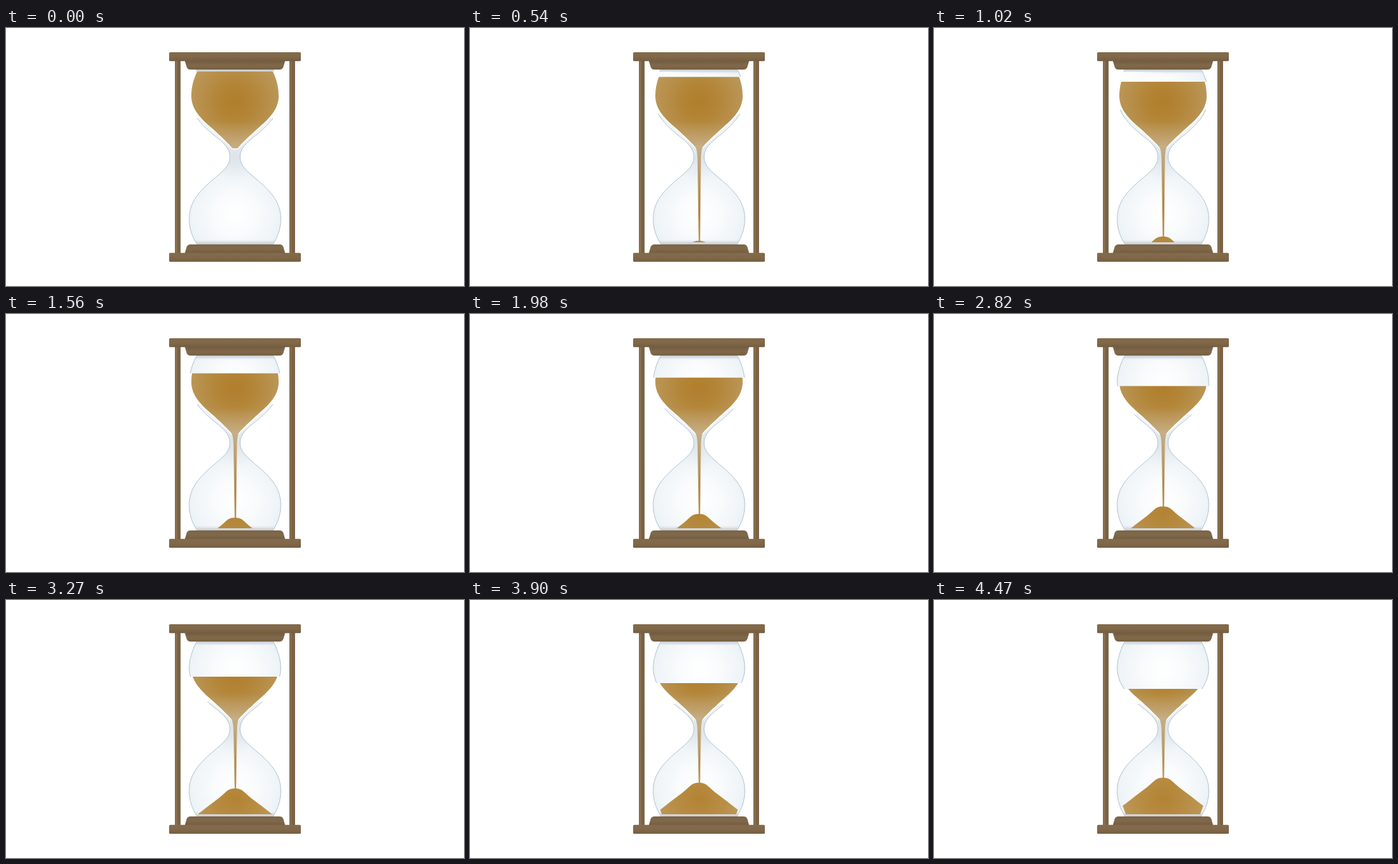
Write an HTML page with a canvas that moves like this. It is 640 px wide and 360 px high and loops after 4500 ms.

```html
<!DOCTYPE html>
<html lang="en">
<head>
<meta charset="utf-8">
<title>Hourglass</title>
<style>
html, body { margin: 0; width: 100%; height: 100%; overflow: hidden; background: #fff; }
canvas { display: block; width: 640px; height: 360px; }
</style>
</head>
<body>
<canvas id="stage" width="640" height="360"></canvas>
<script>
const ctx = document.getElementById('stage').getContext('2d');
const LOOP = 4500, STEP = 30, MID = 320, FLOOR = 299;

// Left-hand outlines; the right side is their mirror image.
const glassSide = 'M267 57C262 66 256.5 80 256 94C256 118 272 134 290 149C304 160 313 168 313 180' +
  'C313 192 304 199 290 211C272 226 256 242 256 266C256 280 260 291 267 302';
const sandSide = 'M268 59C262 71 259 82 259 95C259 114 273 127 288 140C298 149 308 158 314 165C316 168 318 168 320 168';
const pileSide = 'M320 0C315 0 311 1 307 5C303 9 299 12 294 16L282 25L268 36L258 43';

const mirror = new DOMMatrix([-1, 0, 0, 1, 2 * MID, 0]);
function bothSides(side) {
  const path = new Path2D(side);
  path.addPath(new Path2D(side), mirror);
  return path;
}
const glassLine = bothSides(glassSide);
const glassBody = bothSides(glassSide + 'L320 302L320 57Z');
const sandLine = bothSides(sandSide);
const sandBody = bothSides(sandSide + 'L320 59Z');
const pileBody = bothSides(pileSide + 'L258 70L320 70Z');
const pileRoom = new Path2D('M268 299L259 274V230H381V274L372 299Z');

function addStops(gradient, stops) {
  stops.forEach(([at, color]) => gradient.addColorStop(at, color));
  return gradient;
}
const linear = (x0, y0, x1, y1, ...stops) => addStops(ctx.createLinearGradient(x0, y0, x1, y1), stops);
const radial = (x, y, r, ...stops) => addStops(ctx.createRadialGradient(x, y, 0, x, y, r), stops);

function fill(paint, path) {
  ctx.fillStyle = paint;
  ctx.fill(path);
}
function box(paint, x, y, w, h) {
  ctx.fillStyle = paint;
  ctx.fillRect(x, y, w, h);
}
function clipped(path, draw) {
  ctx.save();
  ctx.clip(path);
  draw();
  ctx.restore();
}
function area(x, y, w, h) {
  const path = new Path2D();
  path.rect(x, y, w, h);
  return path;
}

// Piecewise linear lookup through [time, value] pairs.
function along(points, t) {
  const i = points.findIndex(p => p[0] > t);
  if (i < 0) return points[points.length - 1][1];
  const [t0, a] = points[i - 1], [t1, b] = points[i];
  return a + (b - a) * (t - t0) / (t1 - t0);
}
const rimStart = [[0, 126], [1020, 114], [1560, 126], [2400, 138], [3270, 142], [3900, 145]];

const bulbPaint = y => radial(MID, y, 74, [0, '#ffffff'], [0.4, '#f9fbfc'], [0.8, '#eff4f8'], [1, '#e6eef3']);
const upperGlass = bulbPaint(98), lowerGlass = bulbPaint(260);
const neckPaint = radial(MID, 180, 36, [0, 'rgba(220,226,232,.9)'], [1, 'rgba(226,233,239,0)']);
const sandPaint = radial(MID, 103, 72, [0, '#b07e2c'], [0.35, '#b38537'], [0.65, '#b78f4a'], [1, '#bc9a5e']);
const tipPaint = linear(0, 130, 0, 168, [0, 'rgba(200,178,140,0)'], [1, 'rgba(202,182,148,.75)']);
const streamPaint = linear(0, 162, 0, 260, [0, '#c6b08a'], [0.4, '#bb9d6a'], [1, '#ad8238']);
const pilePaint = radial(MID, 278, 58, [0, '#b28334'], [0.5, '#b78c42'], [1, '#bd9758']);
const rimShade = (from, to) => linear(0, from, 0, to, [0, '#c4c8ce'], [0.4, '#d8dce2'], [1, 'rgba(230,234,240,0)']);

function drawGlass() {
  clipped(area(250, 50, 140, 130), () => fill(upperGlass, glassBody));
  clipped(area(250, 180, 140, 125), () => fill(lowerGlass, glassBody));
  fill(neckPaint, glassBody);
  clipped(glassBody, () => {
    box(rimShade(58, 64), 256, 57, 128, 7);
    box(rimShade(302, 295), 256, 295, 128, 7);
  });
  ctx.strokeStyle = '#b4c7ce';
  ctx.lineWidth = 1;
  ctx.stroke(glassLine);
}

function drawUpperSand(t) {
  const level = 60.5 + t * 0.01422;
  if (t < 1290) {
    const veil = linear(262, 0, 325, 0, [0, '#fff'], [1, 'rgba(255,255,255,0)']);
    box(veil, 252, 61, 73, Math.max(0, level - 61));
  }
  const rim = along(rimStart, t);
  box('#fff', 250, level, 140, rim - level);
  clipped(area(250, level, 140, 175 - level), () => {
    ctx.strokeStyle = '#fff';
    ctx.lineWidth = 3;
    ctx.stroke(sandLine);
    fill(sandPaint, sandBody);
    fill(tipPaint, sandBody);
  });
}

function drawLowerSand(t) {
  const peak = 303.7 - t * 0.01246;
  const tip = Math.min(168 + t * 0.345, peak + 2, FLOOR);
  if (t > 0) {
    const neck = Math.min(182, tip);
    const stream = new Path2D(
      `M314 164Q317.6 169 317.9 ${neck}L319.7 ${tip}H321.4L322.7 ${neck}Q323 169 326 164Z`);
    fill(streamPaint, stream);
  }
  if (peak < FLOOR) clipped(pileRoom, () => {
    const pile = new Path2D();
    pile.addPath(pileBody, new DOMMatrix([1, 0, 0, 1, 0, peak]));
    fill(pilePaint, pile);
  });
}

function drawFrame() {
  for (const x of [236, 396]) {
    box(linear(x, 0, x + 8, 0, [0, '#806849'], [0.25, '#8a7253'], [0.6, '#755e41'], [1, '#846c4d']), x, 45, 8, 270);
  }
  const capPaint = linear(0, 46, 0, 58, [0, '#735d41'], [0.5, '#80694a'], [1, '#766043']);
  fill(capPaint, new Path2D('M250 46H390L388 53Q387 58 382 58H258Q253 58 252 53Z'));
  const basePaint = linear(0, 302, 0, 314, [0, '#7b6547'], [0.5, '#80694a'], [1, '#735d41']);
  fill(basePaint, new Path2D('M250 314L252 307Q253 302 258 302H382Q387 302 388 307L390 314Z'));
  for (const y of [33.7, 313.8]) {
    const bar = new Path2D();
    bar.roundRect(228, y, 184, 12.5, 1.5);
    fill(linear(0, y, 0, y + 12.5, [0, '#826a4b'], [0.5, '#816849'], [1, '#745d40']), bar);
  }
}

function draw(t) {
  box('#fff', 0, 0, 640, 360);
  drawGlass();
  drawUpperSand(t);
  drawLowerSand(t);
  drawFrame();
}

const start = performance.now();
function tick() {
  const t = (performance.now() - start) % LOOP;
  draw(Math.floor(t / STEP) * STEP);
  requestAnimationFrame(tick);
}
tick();
</script>
</body>
</html>
```
